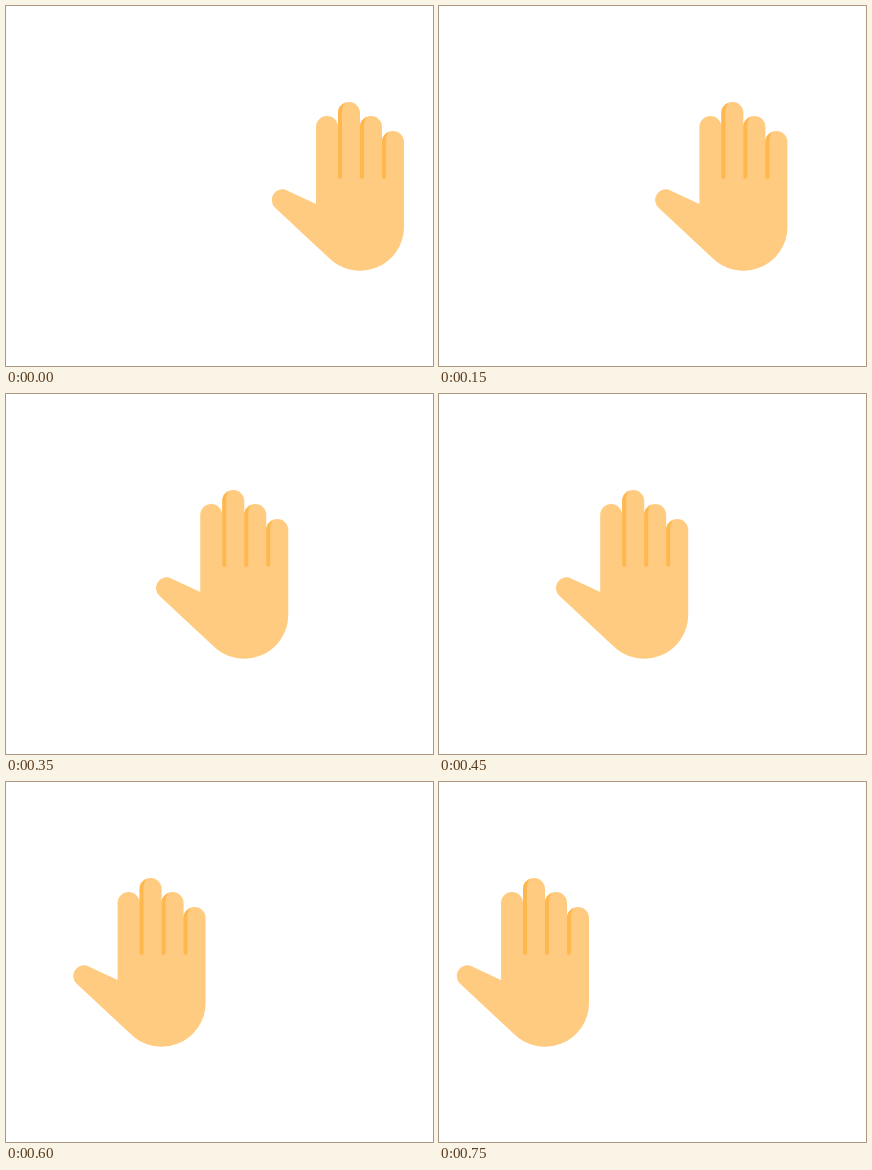
Recreate the animation shown at these times as an HTML page. Size 427 by 360 pixels, loop 800 ms.

```html
<!DOCTYPE html>
<html lang="en">
<head>
<meta charset="utf-8">
<title>Sliding hand</title>
<style>
  html, body { margin: 0; width: 100%; height: 100%; overflow: hidden; background: #fff; }
  svg { display: block; }
</style>
</head>
<body>
<svg width="427" height="360" viewBox="0 0 427 360">
  <defs>
    <path id="crease" fill="#ffb74f" d="M0 11A11 11 0 0 1 7 .8Q4 4 4 11V0z"/>
  </defs>
  <g id="hand">
    <path fill="#ffcb80" d="M310 198V121a11 11 0 0 1 22 0V107a11 11 0 0 1 22 0V121a11 11 0 0 1 22 0V136a11 11 0 0 1 22 0V221A44 44 0 0 1 322.5 251.5L269.1 201.7A10.6 10.6 0 0 1 281.5 184.7z"/>
    <g id="creases" fill="#ffb74f"></g>
  </g>
</svg>
<script>
  const LOOP = 800, STEP = 50, TRAVEL = 248;
  const hand = document.getElementById('hand');
  const lastStep = LOOP / STEP - 1;

  // Shaded left edge of a finger: follows its rounded tip, ends round at the palm
  const crease = (x, top) =>
    `<path d="M${x} ${top + 11}a11 11 0 0 1 7-10.2q-3 3.2-3 10.2V171a2 2 0 0 1-4 0z"/>`;

  document.getElementById('creases').innerHTML =
    crease(332, 96) + crease(354, 110) + crease(376, 125);

  function draw(now) {
    const step = Math.floor(now % LOOP / STEP);
    hand.setAttribute('transform', `translate(${-TRAVEL * step / lastStep} 0)`);
    requestAnimationFrame(draw);
  }
  draw(performance.now());
</script>
</body>
</html>
```
